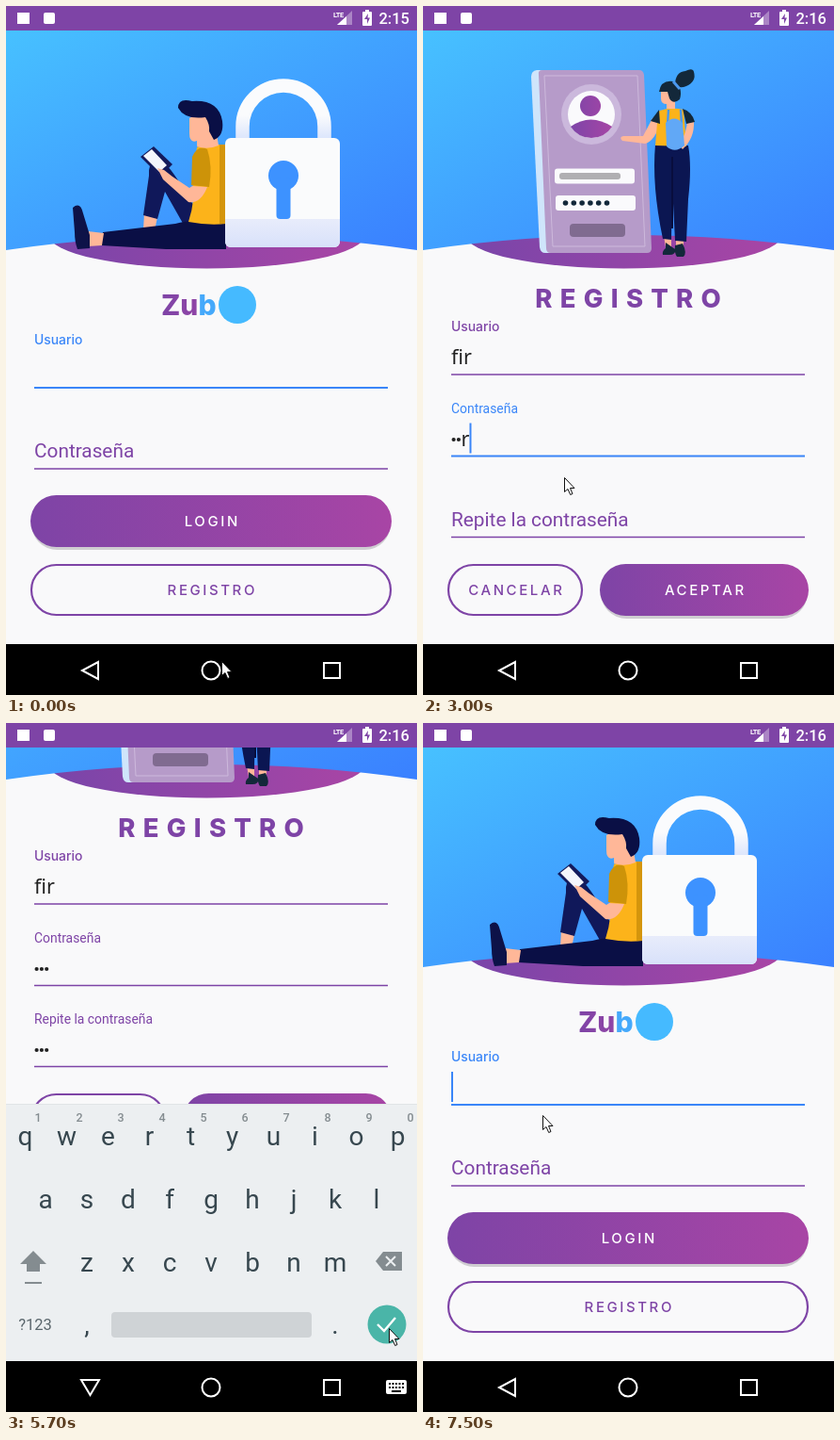
Write an HTML page with a canvas that moves like this. It is 437 by 731 pixels and loops after 8 s.

```html
<!DOCTYPE html>
<html lang="es">
<head>
<meta charset="utf-8">
<title>Registro</title>
<style>
html, body { margin: 0; width: 100%; height: 100%; overflow: hidden; background: #000; }
canvas { display: block; }
</style>
</head>
<body>
<canvas id="stage" width="437" height="731"></canvas>
<script>
const W = 437, H = 731, LOOP = 8000, STEP = 100;
const PURPLE = '#7e44a6', PINK = '#a845a5', BLUE = '#3a86f8', PAGE = '#f9f9fa';
const NAVY = '#0a0f45', SKIN = '#ffb798', DARK = '#13283a', WORD = 'fir';
const ROBOTO = 'Roboto, sans-serif', INTER = 'Inter, sans-serif';
const main = document.getElementById('stage').getContext('2d');
const sheet = document.createElement('canvas');
sheet.width = W; sheet.height = H;
const sheetCtx = sheet.getContext('2d');
let c = main;

const clamp = v => Math.max(0, Math.min(1, v));
const prog = (t, start, dur) => clamp((t - start) / dur);
const mix = (a, b, p) => a + (b - a) * p;
const easeOut = (p, n) => 1 - (1 - p) ** n;
const blink = (t, start) => t >= start && Math.floor((t - start) / 500) % 2 === 0;

function rect(x, y, w, h, fill, r = 0) {
  c.fillStyle = fill;
  c.beginPath();
  c.roundRect(x, y, w, h, r);
  c.fill();
}
function disc(x, y, rx, fill, ry = rx) {
  c.fillStyle = fill;
  c.beginPath();
  c.ellipse(x, y, rx, ry, 0, 0, 7);
  c.fill();
}
function shape(fill, d) {
  c.fillStyle = fill;
  c.fill(new Path2D(d));
}
function line(color, width, d) {
  c.strokeStyle = color;
  c.lineWidth = width;
  c.stroke(new Path2D(d));
}
function text(s, x, y, font, color, align = 'left', gap = 0) {
  c.font = font;
  c.fillStyle = color;
  c.textAlign = align;
  c.letterSpacing = gap + 'px';
  c.fillText(s, align === 'center' ? x + gap / 2 : x, y);
  c.letterSpacing = '0px';
}
function fade(x0, y0, x1, y1, a, b) {
  const g = c.createLinearGradient(x0, y0, x1, y1);
  g.addColorStop(0, a);
  g.addColorStop(1, b);
  return g;
}
// Draws a whole group once, then blends it as a single layer.
function layer(alpha, dy, draw) {
  if (alpha <= 0) return;
  c = sheetCtx;
  c.clearRect(0, 0, W, H);
  draw();
  c = main;
  c.globalAlpha = alpha;
  c.drawImage(sheet, 0, dy);
  c.globalAlpha = 1;
}

function sky() {
  rect(0, 0, W, 677, PAGE);
  disc(213.5, 243, 168, fade(52, 0, 375, 0, '#7a45a9', PINK), 35.5);
  shape(fade(0, 26, 193, 389, '#47c1ff', '#3a80ff'), 'M0 26H437V259Q218 227 0 259Z');
  // The island's upper rim overlaps the sky a little.
}

function man() {
  shape(SKIN, 'M147 220L161 224L158 238H146Z');
  shape('#10185a', 'M218 230L196 207Q172 163 160 162Q151 166 152 180L146 222L161 226L169 197L190 234Z');
  shape(NAVY, 'M234 231Q200 225 180 231L103 240L101 254L170 258H234Z');
  shape(SKIN, 'M104 241L87 239L87 255L102 254Z');
  shape('#0d1248', 'M71 214Q79 207 82 220L89 243V257L76 258Q73 250 73 240Z');
  shape('#fcb31a', 'M203 150Q212 144 234 148V231Q215 233 194 229Q202 205 198 185Z');
  shape('#d4950c', 'M227 147H234V231H227Z');
  shape('#cd9309', 'M198 160Q204 147 214 152Q220 170 216 192L197 190Z');
  shape('#141a5c', 'M143 160L157 149L177 168L164 181Z');
  shape('#f4f5fc', 'M146 159L155 152L171 169L163 176Z');
  shape(SKIN, 'M198 191L214 192Q207 210 194 208L167 184L161 172L168 174L177 181L195 193Z');
  shape(SKIN, 'M195 119Q210 110 222 124L226 148Q214 153 203 149V143Q195 146 195 135Z');
  shape(NAVY, 'M183 108Q183 97 198 101Q226 99 230 122Q232 138 221 142L216 133Q217 126 212 118Q190 121 183 108Z');
}

function lock() {
  line(fade(0, 116, 0, 141, '#fafbfd', '#dbe5fc'), 14.5, 'M251.5 142V128A43.5 43.5 0 0 1 338.5 128V142');
  rect(233, 140, 122, 116, '#fafbfc', 6);
  c.fillStyle = fade(0, 226, 0, 256, '#e8ecfb', '#d8e1fa');
  c.beginPath();
  c.roundRect(233, 226, 122, 30, [0, 0, 6, 6]);
  c.fill();
  disc(295, 180, 16, '#3d92ff');
  rect(287.5, 182, 15, 44, '#3d92ff', 4);
}

function card() {
  shape('#cfe5fb', 'M121 68H226V262H130Q125 262 124 256L115 75Q115 69 121 68Z');
  shape('#b69bc9', 'M127 68H230Q234 68 235 73L243 257Q243 262 238 262H136Q131 262 131 257L123 73Q122 68 127 68Z');
  line('#cdb9dc', 1, 'M129 74H228L236 255H138Z');
  disc(179, 115, 32, '#cbb8dc');
  disc(179, 115, 25, '#fafafc');
  const g = fade(155, 0, 203, 0, '#7b45a8', PINK);
  disc(178, 106, 11, g);
  shape(g, 'M157 128Q178 113 201 128Q193 140 179 140Q165 140 157 128Z');
  rect(140, 172.5, 85, 16, '#fafafc', 3);
  rect(145, 177, 65, 7, '#b0afb2', 3);
  rect(141, 201, 85, 16, '#fafafc', 3);
  for (let i = 0; i < 6; i++) disc(151.5 + i * 8.8, 209, 2.8, DARK);
  rect(156, 231, 59, 14, '#806b90', 4);
}

function woman() {
  shape(SKIN, 'M256 244H264V256H258ZM269 244H277V258H269Z');
  shape(DARK, 'M258 251L268 258Q269 264 262 264H255Q254 260 258 257ZM268 254L276 252Q281 262 277 266H270Q267 262 268 254Z');
  shape('#0b1652', 'M247 147L282 148Q286 170 282 205L280 250L268 249L265 190L264 248L255 247Q243 190 247 147Z');
  line('#080d3d', 2, 'M265 160V236');
  shape(SKIN, 'M244 119L253 123Q246 144 236 146L212 143Q208 139 213 138L234 138Z');
  shape('#fcb31a', 'M250 112Q262 106 277 110L280 149L247 148Z');
  shape(SKIN, 'M281 120L288 122Q289 140 276 152L272 147Q281 135 281 120Z');
  shape(DARK, 'M251 110L242 122L252 125ZM276 109Q286 112 289 123L280 125Z');
  line('#4b97ee', 2.5, 'M261 110L260 126M274 110L275 126');
  shape('#61a8f6', 'M258 124Q267 115 276 124L278 148Q268 157 259 149Z');
  shape(SKIN, 'M253 86H268V109H259V104Q253 104 253 98Z');
  shape(DARK, 'M251 91Q253 78 266 80Q277 86 273 99Q266 105 262 98L260 91Z');
  shape(DARK, 'M268 84Q268 70 279 69Q287 65 288 70Q291 80 280 85Q273 88 268 84Z');
  line('#4b97ee', 3, 'M266 80L273 88');
}

function button(label, x, y, w, filled) {
  if (filled) {
    rect(x + 1, y + 3, w - 2, 55, '#cfcdd1', 27.5);
    rect(x, y, w, 55, fade(x, 0, x + w, 0, PURPLE, PINK), 27.5);
  } else {
    c.strokeStyle = PURPLE;
    c.lineWidth = 2.2;
    c.beginPath();
    c.roundRect(x + 1, y + 1, w - 2, 53, 26.5);
    c.stroke();
  }
  text(label, x + w / 2, y + 33, `500 15px ${INTER}`, filled ? '#fff' : PURPLE, 'center', 2.6);
}

// up: 0 is the large hint, 1 the small floating label.
function field(y, label, o) {
  const up = o.up ?? 1, color = o.focus ? BLUE : PURPLE;
  const size = mix(20.8, 13.9, up);
  text(label, 30, y - mix(12, 46, up), `${o.face || ''} ${size}px ${o.face ? INTER : ROBOTO}`, color);
  const thick = o.focus ? 2 : 1.3;
  rect(30, y - thick / 2, 376, thick, color);
  let x = 30;
  for (let i = 0; i < (o.dots || 0); i++, x += 5.3) disc(x + 2.6, y - 17.5, 2.1, '#222');
  if (o.value) {
    text(o.value, x, y - 11, '21.5px "Noto Sans", sans-serif', '#222');
    x += c.measureText(o.value).width;
  }
  if (o.caret) rect(x, y - 35, 2, 32, BLUE);
}

function secret(times, hideAt, t) {
  const n = times.filter(k => t >= k).length;
  return n && t < hideAt ? { dots: n - 1, value: WORD[n - 1] } : { dots: n };
}

// A window paints its own status strip and the black below its page.
function frameWindow(pan, page) {
  rect(0, 0, W, H, '#000');
  c.save();
  c.translate(0, -pan);
  page();
  c.restore();
  rect(0, 0, W, 26, PURPLE);
}

function login(t, pan) {
  frameWindow(pan, () => {
    sky();
    man();
    lock();
    text('Zu', 165, 328, `800 30px ${INTER}`, fade(165, 0, 205, 0, PURPLE, '#9045a6'));
    const w = c.measureText('Zu').width;
    text('b', 165 + w, 328, `800 30px ${INTER}`, '#45a9fb');
    disc(246, 317, 20, '#45baff');
    field(405, 'Usuario', { face: 500, focus: true, caret: blink(t, 6500) });
    field(491, 'Contraseña', { up: 0 });
    button('LOGIN', 26, 519, 384, true);
    button('REGISTRO', 26, 592, 384, false);
  });
}

function register(t, pan, drop) {
  const latest = times => times.filter(k => t >= k).pop();
  const typed = [1800, 2100, 2200].filter(k => t >= k).length;
  const userKey = latest([500, 1800, 2100, 2200]);
  const passKey = latest([2500, 2800, 2900, 3000]);
  const againKey = latest([3800, 4600, 4700, 4900]);
  const inUser = t < 2500, inPass = !inUser && t < 3800, inAgain = t >= 3800 && t < 5600;
  frameWindow(pan, () => {
    sky();
    card();
    woman();
    if (t >= 800) text('REGISTRO', 218, 320, `800 27.5px ${INTER}`, PURPLE, 'center', 8.3);
    else text('REGISTRO', 219.5, 317, `28px ${ROBOTO}`, PURPLE, 'center', 8.1);
    c.translate(0, -Math.min(8, drop));
    field(391, 'Usuario', {
      face: 500, focus: inUser, value: WORD.slice(0, typed), caret: inUser && blink(t, userKey + 100 * !typed)
    });
    field(477.5, 'Contraseña', {
      up: prog(t, 2420, 160), focus: inPass, caret: inPass && blink(t, passKey),
      ...secret([2800, 2900, 3000], 3900, t)
    });
    field(563.5, 'Repite la contraseña', {
      up: prog(t, 3750, 200), focus: inAgain, caret: inAgain && blink(t, againKey),
      ...secret([4600, 4700, 4900], 5600, t)
    });
    button('CANCELAR', 26, 592, 144, false);
    button('ACEPTAR', 188, 592, 222, true);
  });
}

function keyboard(done) {
  const ink = '#37474f', gray = '#848c90';
  rect(0, 404, W, 273, '#eceff1');
  rect(0, 404, W, 1, '#e0e4e6');
  rect(0, 677, W, H, '#000');
  const row = (keys, x, y, font = `28px ${ROBOTO}`, color = ink) => [...keys].forEach((k, i) =>
    text(k, x + i * 44, y, font, color, 'center'));
  row('qwertyuiop', 20.5, 448);
  row('asdfghjkl', 42, 515);
  row('zxcvbnm', 86, 582);
  row('1234567890', 34, 423, `500 12.5px ${ROBOTO}`, gray);
  shape(gray, 'M29 560L43 574H36V582H22V574H15Z');
  rect(20, 593, 18, 2, gray);
  shape(gray, 'M393 571L401 561H421V581H401Z');
  line('#eceff1', 2, 'M404 566L414 576M414 566L404 576');
  text('?123', 31, 644, `16.5px ${ROBOTO}`, '#5a666c', 'center');
  row(',', 86, 648);
  row('.', 350, 648);
  rect(112, 625, 213, 27, '#cfd3d6', 4);
  disc(405, 638, 20.5, '#4ab5a8');
  line('#fff', 2.4, done ? 'M395 638L402 645L414 631' : 'M414 631V638H396M402 632L396 638L402 644');
}

function system(t, ime) {
  rect(12, 7, 13, 12, '#fff');
  rect(40, 7, 12, 12, '#fff', 2);
  text('LTE', 348, 12, `700 7.5px ${ROBOTO}`, '#fff', 'left', -0.5);
  shape('rgba(255,255,255,.35)', 'M368 5V20H352Z');
  shape('#fff', 'M362 11V20H352Z');
  rect(379, 6, 10, 15, '#fff', 1);
  rect(382, 4, 4, 3, '#fff');
  shape(PURPLE, 'M385 8L381 14H384V19L387 12.5H384.5Z');
  text(t < 400 ? '2:15' : '2:16', 429, 19, `500 16.5px ${ROBOTO}`, '#fff', 'right');

  line('#fff', 2, ime ? 'M80 697H99L89.5 713Z' : 'M98 696V714L81 705Z');
  line('#fff', 2, 'M208.5 705a9.5 9.5 0 1 0 19 0a9.5 9.5 0 1 0 -19 0M338 697H355V713H338Z');
  if (ime) {
    rect(404, 697, 22, 15, '#fff', 2);
    for (let i = 0; i < 10; i++) rect(407 + i % 5 * 3.5, 700 + Math.floor(i / 5) * 4, 2, 2, '#000');
    rect(410, 708, 10, 2, '#000');
  }
}

const TRACK = [
  [0, 229, 695], [100, 229, 695], [400, 212, 625], [550, 208, 618], [700, 178, 567], [900, 150, 500],
  [3350, 150, 500], [3600, 118, 537], [5050, 118, 537], [5500, 407, 642], [5750, 407, 642],
  [6300, 302, 384], [6600, 302, 384], [6800, 309, 388], [7200, 253, 439], [7350, 253, 439],
  [7500, 127, 416], [LOOP, 127, 416]
];
function pointer(t) {
  const i = TRACK.findIndex(k => k[0] > t);
  const [a, ax, ay] = TRACK[i - 1], [b, bx, by] = TRACK[i];
  const p = (t - a) / (b - a);
  c.save();
  c.translate(Math.round(mix(ax, bx, p)) + 0.5, Math.round(mix(ay, by, p)) + 0.5);
  const d = 'M0 0V15L3.5 12L6.2 18L8.5 17L6 11H10.5Z';
  shape('#fff', d);
  line('#111', 1, d);
  c.restore();
}

// A new window rises into place while it fades in.
function slideIn(t, start, draw) {
  const drop = 58 * (1 - prog(t, start, 350)) ** 5;
  const alpha = easeOut(prog(t, start, 120), 2.2), dy = Math.round(drop);
  layer(alpha, 0, () => rect(0, 0, W, dy, '#74409a'));
  layer(alpha, dy, () => draw(drop));
}

function render(t) {
  const openA = 586, openB = 6552, dur = 350;
  const pan = Math.round(169.5 * easeOut(prog(t, 3989, 210), 2) + 73.5 * easeOut(prog(t, 5655, 200), 2));
  if (t < openA + dur) {
    login(0, 0);
    slideIn(t, openA, drop => register(t, 0, drop));
  } else if (t < openB + dur) {
    register(t, pan, 0);
  }
  slideIn(t, openB, () => login(t, t < 6700 ? 10 : 0));

  const show = Math.min(prog(t, 4000, 200), 1 - prog(t, 6600, 200));
  layer(easeOut(show, 3), Math.round(20 * (1 - show) ** 2), () => keyboard(t < 6500));
  system(t, t >= 3900 && t < 6500);
  pointer(t);
}

// The screen refreshes ten times a second.
function tick() {
  const t = performance.now() % LOOP;
  render(Math.floor(t / STEP) * STEP);
  requestAnimationFrame(tick);
}
tick();
</script>
</body>
</html>
```
